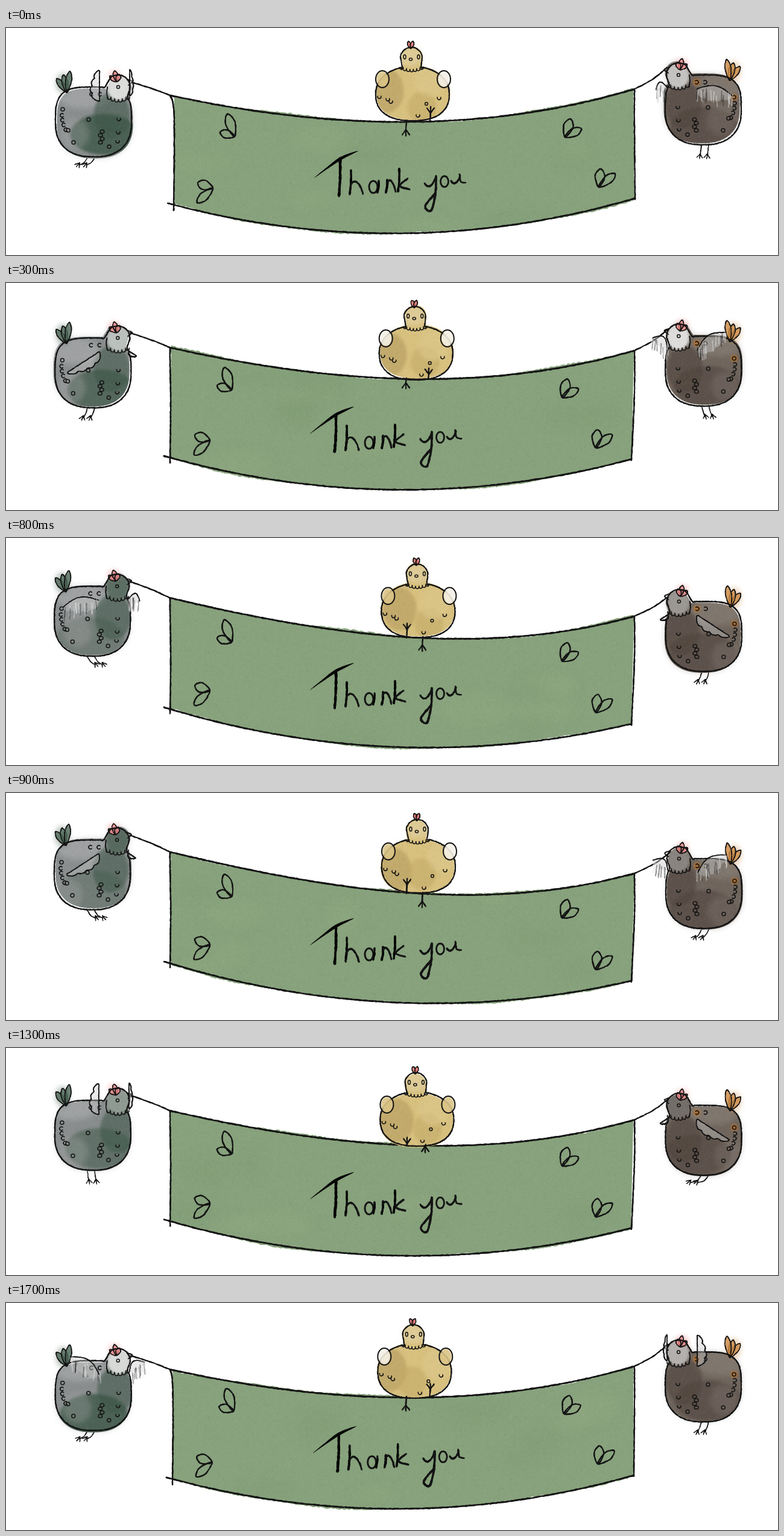
Write an HTML page with a canvas that moves like this. It is 1280 px wide and 377 px high and loops after 1800 ms.

```html
<!DOCTYPE html>
<html lang="en">
<head>
<meta charset="utf-8">
<title>Thank you</title>
<style>
html, body { margin: 0; width: 100%; height: 100%; overflow: hidden; background: #fff; }
canvas { display: block; width: 100vw; height: 100vh; }
</style>
</head>
<body>
<canvas id="stage" width="1280" height="377" role="img" aria-label="Three hens with a banner: Thank you"></canvas>
<script>
const ctx = document.getElementById('stage').getContext('2d');
const STEPS = 18, STEP_MS = 100, INK = '#141414';
const { PI, sin, cos, abs, max, min, hypot } = Math;
const TAU = PI * 2;

let seed = 1;
function rnd() {
  seed = (seed + 0x6D2B79F5) | 0;
  let t = Math.imul(seed ^ (seed >>> 15), 1 | seed);
  t = (t + Math.imul(t ^ (t >>> 7), 61 | t)) ^ t;
  return ((t ^ (t >>> 14)) >>> 0) / 4294967296;
}
const jit = a => (rnd() * 2 - 1) * a;
const lerp = (a, b, k) => a + (b - a) * k;
const clamp = v => max(0, min(1, v));
const mix = (a, b, k) => `rgb(${a.map((v, n) => Math.round(lerp(v, b[n], k)))})`;
const range = (n, f) => Array.from({ length: n + 1 }, (_, j) => f(j / n));
function at(x, y, f, sx = 1) {
  ctx.save();
  ctx.translate(x, y);
  ctx.scale(sx, 1);
  f();
  ctx.restore();
}

// Catmull-Rom curve through a few points
function smooth(pts, closed) {
  const n = pts.length, out = [];
  const p = j => closed ? pts[(j + n) % n] : pts[max(0, min(n - 1, j))];
  for (let j = 0; j < (closed ? n : n - 1); j++) {
    const [a, b, c, d] = [p(j - 1), p(j), p(j + 1), p(j + 2)];
    const m = max(2, Math.ceil(hypot(c[0] - b[0], c[1] - b[1]) / 3));
    for (let q = 0; q < m; q++) {
      const t = q / m, u = t * t, v = u * t;
      out.push([0, 1].map(x => .5 * (2 * b[x] + (c[x] - a[x]) * t +
        (2 * a[x] - 5 * b[x] + 4 * c[x] - d[x]) * u + (3 * b[x] - a[x] - 3 * c[x] + d[x]) * v)));
    }
  }
  out.push(closed ? pts[0] : pts[n - 1]);
  return out;
}

// Charcoal line with uneven width
function ink(pts, w = 1.8, closed = false, color = INK) {
  const line = smooth(pts, closed);
  ctx.strokeStyle = color;
  ctx.lineCap = 'round';
  let [x, y] = line[0];
  for (const [px, py] of line.slice(1)) {
    const nx = px + jit(.25), ny = py + jit(.25);
    ctx.lineWidth = w * (.8 + rnd() * .4);
    ctx.beginPath();
    ctx.moveTo(x, y);
    ctx.lineTo(nx, ny);
    ctx.stroke();
    x = nx; y = ny;
  }
}
function trace(pts) {
  ctx.beginPath();
  pts.forEach(p => ctx.lineTo(...p));
  ctx.closePath();
}
function fill(pts, color, alpha = 1) {
  ctx.globalAlpha = alpha;
  ctx.fillStyle = color;
  trace(pts);
  ctx.fill();
  ctx.globalAlpha = 1;
}
function blob(x, y, rx, ry, color, alpha = 1, blur = 2) {
  ctx.save();
  ctx.filter = `blur(${blur}px)`;
  ctx.globalAlpha = alpha;
  ctx.fillStyle = color;
  ctx.beginPath();
  ctx.ellipse(x, y, rx, ry, 0, 0, TAU);
  ctx.fill();
  ctx.restore();
}
function oval(x, y, rx, ry = rx, w = 1.5, from = 0, to = TAU) {
  ctx.strokeStyle = INK;
  ctx.lineWidth = w;
  ctx.beginPath();
  ctx.ellipse(x, y, rx, ry, 0, from, to);
  ctx.stroke();
}
const cup = (x, y, r = 3) => oval(x, y, r, r, 1.6, -.3, PI + .3);
const cee = (x, y) => oval(x, y, 3, 3, 1.6, .8, TAU - .8);
function scallops(x0, x1, y, n, dip) {
  const r = (x1 - x0) / n / 2;
  for (let j = 0; j < n; j++) cup(x0 + r * (2 * j + 1), y + dip * sin((j + .5) / n * PI), r);
}
// Pointed petal from a root to a tip: leaves, tails and combs
function petal(x, y, tx, ty, w, color, line = 1.7) {
  const dx = tx - x, dy = ty - y, l = hypot(dx, dy), px = -dy / l * w, py = dx / l * w;
  const pts = [[x, y], [x + dx * .6 + px, y + dy * .6 + py], [tx, ty], [x + dx * .6 - px, y + dy * .6 - py]];
  if (color) fill(smooth(pts, true), color, .8);
  ink(pts, line, true);
}

const grain = (() => {
  const c = document.createElement('canvas');
  c.width = c.height = 256;
  const g = c.getContext('2d');
  for (let n = 0; n < 6000; n++) {
    g.fillStyle = rnd() < .5 ? 'rgba(255,255,255,.03)' : 'rgba(0,0,0,.02)';
    g.fillRect(rnd() * 256, rnd() * 256, 1 + rnd() * 2, 1 + rnd() * 2);
  }
  return ctx.createPattern(c, 'repeat');
})();

// Loose paint inside a shape: halo, base colour, then blots and grain
function wash(shape, color, halo, blots) {
  ctx.save();
  ctx.save();
  ctx.filter = 'blur(4px)';
  fill(shape, color, halo);
  ctx.restore();
  fill(shape, color);
  ctx.clip();
  blots();
  ctx.fillStyle = grain;
  ctx.fillRect(0, 0, 1280, 377);
  ctx.restore();
}
function shifted(pts, a) {
  const ox = jit(a), oy = jit(a);
  return pts.map(([x, y]) => [x + ox, y + oy]);
}

// Hanging line: chord plus sag, pulled towards one side by skew
const hang = (x0, y0, x1, y1, sag, skew) => range(12, s =>
  [lerp(x0, x1, s), lerp(y0, y1, s) + 4 * s * (1 - s) * (sag + skew * (2 * s - 1))]);

const stem = (x, y0, y1, w = 3.6) => ink([[x + 1, y0], [x + 1, (y0 + y1) / 2], [x - 1, y1]], w, false, '#060606');
const arch = (x, y, w, h) => ink(range(10, s =>
  [x + w * s + 2 * s * s, y + h * (1 - sin(PI * min(1, .2 + s * .8)) ** .7)]), 3);

function lettering() {
  fill(smooth([[511, 249], [531, 232], [555, 214], [584, 204], [556, 219], [530, 236]], true), '#060606');
  stem(553, 217, 279, 4.2);
  stem(571, 236, 276);
  arch(571, 255, 19, 21);
  oval(609, 264, 7, 10, 3);
  stem(617, 254, 273, 3);
  stem(631, 252, 273);
  arch(631, 253, 13, 19);
  stem(651, 234, 271);
  ink([[666, 250], [653, 262], [669, 268]], 3.2);
  arch(694, 263, 17, -17);
  ink([[713, 246], [712, 275], [705, 303], [695, 296], [712, 274]], 3.6);
  oval(727, 255, 6.5, 9, 2.8);
  arch(738, 258, 13, -13);
  ink([[752, 243], [754, 255], [762, 257]], 2.8);
}

function banner(k, u) {
  const lx = 272 + 6 * u, rx = 1037 + 6 * u;
  const ly = 112 - 14 * k, ry = 102 + 32 * k;
  const end = [lerp(1097, 1102, k), lerp(65, 98, k)];
  const top = hang(272, ly, 1041, ry, 49, 5 + 7 * k);
  const bottom = hang(lx - 10, 291 - 11 * k, rx, 283 + 29 * k, 54 - 2 * k, 0);

  // The paint strays a little past the line or stops short of it
  const stray = (pts, side) => {
    const a = rnd() * TAU, b = rnd() * TAU, swell = .008 + rnd() * .006;
    return smooth(pts).map(([x, y]) => [max(lx + 1, min(1042, x)) + jit(1),
      y + side * (1 + 2 * sin(x * swell + a) + sin(x * .03 + b)) + jit(1)]);
  };
  wash([...stray(top, -1), ...stray(bottom, 1).reverse()], '#87a27c', 0, () => {
    for (let n = 0; n < 8; n++)
      blob(300 + rnd() * 700, 150 + rnd() * 190, 20 + rnd() * 50, 10 + rnd() * 18,
        rnd() < .5 ? '#94ab86' : '#7f9c75', .3, 9);
  });

  const knot = [lerp(208, 200, k), lerp(90, 68, k)];
  ink([knot, [lerp(knot[0], 272, .6), lerp(knot[1], ly, .55)], top[0]], 2.3);
  ink([top[12], [lerp(1041, end[0], .55), lerp(ry, end[1], .45)], end], 2.2);
  ink(top, 2.8);
  ink(bottom, 2.7);
  ink([top[0], [lx, ly + 20], [lx + 1, 200], [lx, 303 - 13 * k]], 2.5);
  ink([[1042, ry], [1042, ry + 70], [rx, 285 + 29 * k]], 2.4);

  // Root, two tips, and how far the leaf pair rides with the banner
  const leaves = [
    [379, 180, 367, 143, 355, 173, -8], [927, 181, 936, 151, 954, 167, 26],
    [343, 266, 318, 257, 317, 290, -14], [983, 264, 986, 234, 1010, 242, 29]];
  at(5 * (u - 1), 0, () => {
    for (const [x, y, ax, ay, bx, by, ride] of leaves)
      at(0, ride * k, () => {
        petal(x, y, ax, ay, 8, null, 2.3);
        petal(x, y, bx, by, 7, null, 2.3);
      });
  });
  at(7 * (u - 1), 4 * k, lettering);
}

// Outline of a rounded body joined with a round head, seen from the body centre
function figure(cx, cy, rx, ry, boxy, hx, hy, hr) {
  const far = hypot(hx, hy), dir = Math.atan2(hy, hx);
  return range(110, s => {
    const a = s * TAU, n = sin(a) < 0 ? boxy : 2.4;
    const body = (abs(cos(a) / rx) ** n + abs(sin(a) / ry) ** n) ** (-1 / n);
    const d = a - dir, reach = hr * hr - (far * sin(d)) ** 2;
    const r = cos(d) > 0 && reach > 0 ? max(body, far * cos(d) + Math.sqrt(reach)) : body;
    return [cx + r * cos(a), cy + r * sin(a)];
  }).slice(0, -1);
}
const HEN = figure(145, 156, 63, 58, 3.4, 41, -58, 20);
const CHICK = figure(674, 109, 61, 45, 2.1, -2, -59, 18);

// Straight leading edge, scalloped trailing edge; bulges and smears in mid-flap
function wing(len, angle, wide, smear) {
  const dx = cos(angle), dy = sin(angle);
  const spot = (t, d) => [dx * len * t + dy * d, dy * len * t - dx * d];
  const front = range(8, t => spot(t, -11 * smear * sin(PI * t)));
  const back = range(20, t => spot(1 - t, wide * (.3 + sin(PI * (1 - t) ** .7) + .25 * abs(sin(4 * PI * t)))));
  const pts = [...front, ...back];
  fill(pts, '#c9c8c8', .4);
  ink(smear ? front : pts, 1.8, !smear);
  for (let n = 0; smear && n < 16; n++) {
    const [x, y] = spot(rnd(), jit(5));
    ink([[x, y], [x + jit(2), y + 18]], 1.8, false, n % 3 ? 'rgba(225,225,225,.35)' : 'rgba(40,40,40,.35)');
  }
}
function wings(p) {
  const lift = clamp(.35 + sin((p + .17) * PI / 3));
  const smear = lift > 0 && lift < 1 ? 1 : 0;
  const angle = (-213 + 123 * lift) * PI / 180;
  at(155, 121, () => wing(lerp(62, 50, lift), angle, 10, smear));
  at(205, 120 - 8 * lift, () => wing(lerp(14, 42, lift), angle, 4, smear), -1);
}

function foot(x, y, s) {
  const ax = x + s * 15, ay = y + 21 - 6 * abs(s);
  ink([[x, y], [x + s * 6, y + 10], [ax, ay]], 1.6);
  for (const a of [-.75, 0, .75])
    ink([[ax - s, ay - 4], [ax + sin(a + s * .7) * 7, ay - 2 + cos(a + s * .7) * 6]], 1.5);
}

function hen(c, shade, depth, pose, swing) {
  foot(136, 213, swing);
  foot(148, 213, swing);
  wash(shifted(HEN, 3), c.body, .3, () => {
    blob(118 + jit(12), 114 + jit(6), 44, 22, c.light, .6, 5);
    blob(150 + jit(14), 182 + jit(6), 56, 34, c.dark, .3 + .5 * depth, 2);
    blob(180 + jit(8), 150 + jit(12), 30, 38, c.dark, .55, 2);
    blob(110 + jit(10), 180 + jit(12), 24, 26, c.light, .3, 4);
    blob(187, 99, 19, 22, mix([236, 236, 235], c.head, shade), 1, 2);
  });

  blob(180, 78, 11, 9, '#ff9a9a', .35, 3);
  for (let n = 0; n < 3; n++) petal(184, 89, 172 + 8 * n, 80 - 9 * sin(n * 1.4), 4, '#f08a8a');
  blob(95, 92, 12, 17, c.tail, .4, 4);
  for (let n = 0; n < 3; n++) petal(101, 107, 84 + 11 * n, 84 - 6 * n, 5, c.tail);

  ink(HEN, 2.2, true);
  ink([[168, 98], [167, 108], [169, 118]], 1.8);
  scallops(168, 205, 114, 6, 6);
  oval(186, 98, 2.5);
  ink([[201, 85], [210, 89], [203, 95]], 1.7);

  if (c.spot) for (const [x, y] of [[94, 135], [156, 110]]) blob(x, y, 6, 6, c.spot, .75, 1);
  for (const [x, y] of [[137, 152], [112, 190], [171, 197], [94, 135]]) oval(x, y, 3);
  for (let n = 0; n < 4; n++) {
    oval(158 + 1.5 * (-1) ** n, 172 + 6 * n, 3.4, 2.8);
    cee(93 + n * n * .7, 145 + 8 * n);
  }
  oval(103, 170, 3);
  cee(142, 110);
  cee(156, 110);
  for (let n = 0; n < 3; n++) cup(187 - n, 151 + 22 * n - 7 * (n > 1));
  wings(pose);
}

function chick(k, c) {
  const r = Math.sqrt(k), base = 155 + 11 * k;
  at(10 * r, 12 * r, () => {
    wash(shifted(CHICK, 2.5), '#d8c17f', .15, () => {
      blob(638 + jit(8), 112 + jit(8), 28, 36, '#b59c60', .6, 2);
      blob(680 + jit(12), 127 + jit(8), 24, 26, '#c4aa68', .6, 2);
      blob(706 + jit(8), 94 + jit(8), 26, 26, '#dcc88c', .6, 3);
      blob(672, 48, 20, 15, '#e4d6b0', .5, 3);
    });
    for (const x of [667, 675]) petal(671, 34, x, 22, 3, '#e36a66');
    ink(CHICK, 2.1, true);
    for (const x of [624, 726]) {
      blob(x, 85, 10, 13, rnd() < .5 ? '#f4f0e6' : '#d9c386', .9, 1);
      oval(x, 85, 11, 14, 2);
      oval(x < 674 ? 661 : 684, 48, 2, 3.4);
    }
    oval(671, 52, 2.6, 2);
    scallops(653, 692, 65, 7, 5);
    for (const [x, y] of [[633, 118], [638, 122], [619, 114], [718, 116], [683, 145]]) cup(x, y);
    oval(697, 126, 2.4);
  });

  for (const [x, d] of [[664, c], [697 + 6 * c, -c]]) {
    const s = d < 0 ? -1 : 1, y = base + d * 14, tx = x - s;
    ink([[x, base - s], [tx, y]], 2.4);
    for (const t of [-6, 0, 6]) ink([[tx, y], [tx + t, y + s * (10 - abs(t) * .3)]], 2.2);
  }
}

const GREEN = { body: '#898d8d', light: '#aeafb1', dark: '#3d5748', head: [72, 92, 80], tail: '#4c6656' };
const BROWN = { body: '#6f655d', light: '#8b827b', dark: '#4f443c', head: [98, 91, 86], tail: '#cc8a44', spot: '#b8722c' };

function draw(i) {
  seed = 911 + i * 7717;
  const k = 1 - abs(i - 9) / 9;
  const phase = TAU * i / STEPS, c = cos(phase), late = cos(phase - 1);
  ctx.fillStyle = '#fff';
  ctx.fillRect(0, 0, 1280, 377);
  banner(k, max(0, 1 - 3 * k));
  chick(k, c);
  at(-2 * k, -20 * k, () => hen(GREEN, .5 - .4 * c, .5 + .5 * c, (i + 1) % 6, -c));
  at(1301 + k, -20 + 31 * k, () =>
    hen(BROWN, .5 - .4 * late, .5, (i + 3) % 6, .45 - .85 * cos(phase - 1.22)), -1);
}

let shown = 0;
draw(0);
const start = performance.now();
function tick() {
  const i = Math.floor(max(0, performance.now() - start) / STEP_MS) % STEPS;
  if (i !== shown) draw(shown = i);
  requestAnimationFrame(tick);
}
requestAnimationFrame(tick);
</script>
</body>
</html>
```
